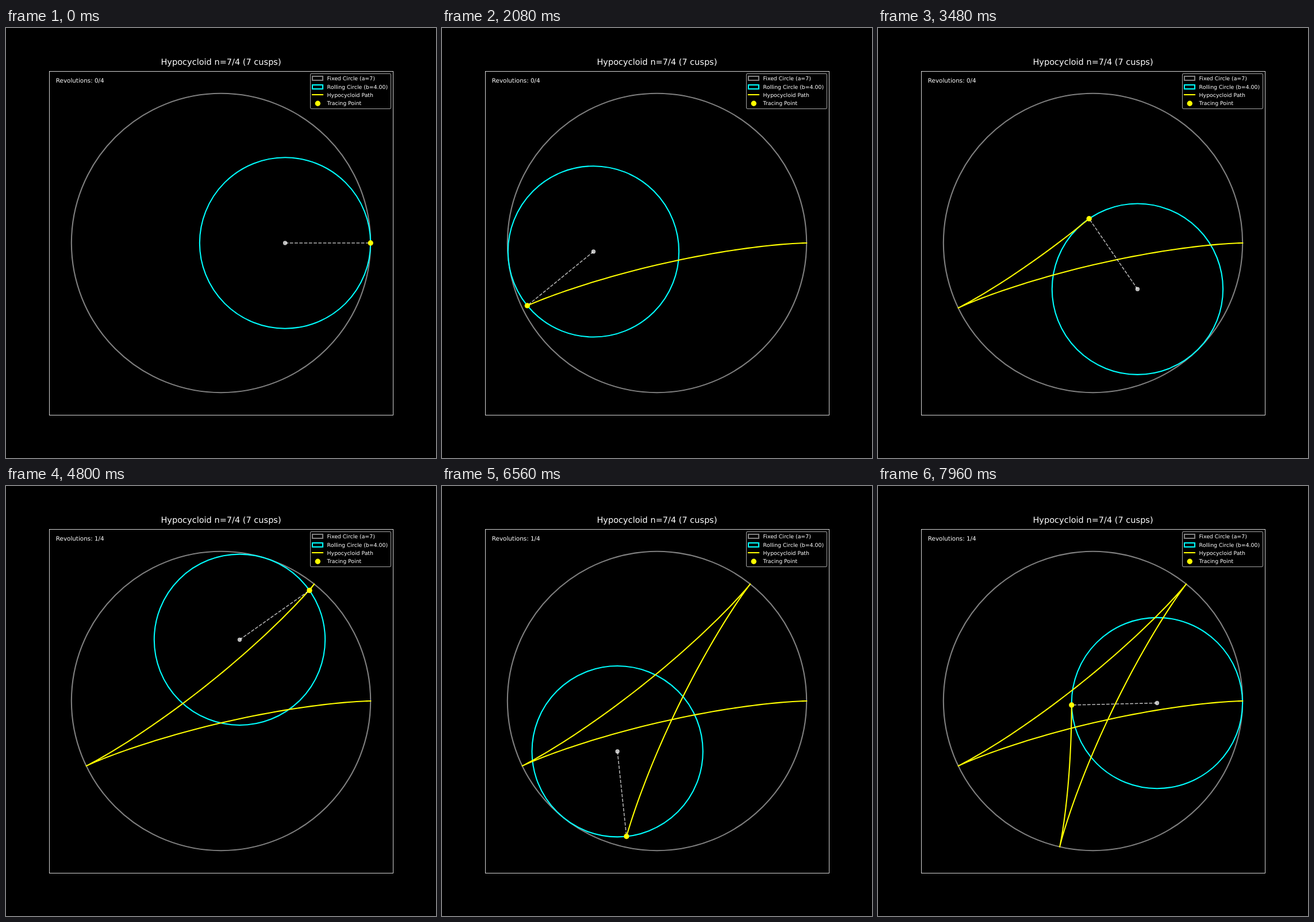
An HTML page for the animation above (8 s loop, 748x748 px).

```html
<!DOCTYPE html>
<html lang="en">
<head>
<meta charset="utf-8">
<title>Hypocycloid</title>
<style>
  html, body { margin: 0; width: 100%; height: 100%; overflow: hidden; background: #000; }
  svg { display: block; width: 100vw; height: 100vh; }
  text { font-family: "DejaVu Sans", sans-serif; fill: #fff; text-rendering: geometricPrecision; }
  .line { fill: none; stroke-width: 2.08; }
  .fixed { stroke: #808080; }
  .rolling { stroke: #0ff; }
  .path { stroke: #ff0; stroke-linecap: square; stroke-linejoin: round; }
  .legend text { font-size: 9.35px; }
</style>
</head>
<body>
<svg viewBox="0 0 748 748">
  <rect width="748" height="748"/>
  <circle class="line fixed" cx="374" cy="374" r="260.17"/>
  <circle id="rolling" class="line rolling" r="148.67"/>
  <polyline id="path" class="line path"/>
  <line id="radius" stroke="#fff" stroke-opacity=".7" stroke-width="1.56" stroke-dasharray="5.77 2.49"/>
  <circle id="center" r="3.12" fill="#fff" fill-opacity=".7" stroke="#fff" stroke-opacity=".7" stroke-width="1.04"/>
  <circle id="tracer" r="4.68" fill="#ff0"/>
  <rect x="75.5" y="75.5" width="598" height="598" fill="none" stroke="#fff" stroke-width=".83"/>
  <text x="374" y="64" font-size="14.54" text-anchor="middle">Hypocycloid n=7/4 (7 cusps)</text>
  <text id="count" x="86.8" y="95" font-size="10.39"></text>
  <g class="legend">
    <rect x="529.5" y="79.5" width="140" height="61" rx="1.9" fill-opacity=".8" stroke="#ccc" stroke-opacity=".8" stroke-width="1.04"/>
    <rect class="line fixed" x="533" y="84" width="18" height="7"/>
    <rect class="line rolling" x="533" y="99" width="18" height="7"/>
    <path class="line path" d="M533 116H551"/>
    <circle cx="542.3" cy="131.2" r="4.68" fill="#ff0"/>
    <text x="558.6" y="91">Fixed Circle (a=7)</text>
    <text x="558.6" y="106">Rolling Circle (b=4.00)</text>
    <text x="558.6" y="120">Hypocycloid Path</text>
    <text x="558.6" y="134">Tracing Point</text>
  </g>
</svg>
<script>
  const MID = 374, UNIT = 598.4 / 16.1;
  const A = 7 * UNIT, B = 4 * UNIT, ARM = A - B;
  const STEP_MS = 40, STEPS = 200, TURN = 2 * Math.PI;
  const STEP_ANGLE = 4 * TURN / 399;
  const el = id => document.getElementById(id);
  const [rolling, path, radius, center, tracer, count] =
    ["rolling", "path", "radius", "center", "tracer", "count"].map(el);

  const set = (node, attrs) => {
    for (const key in attrs) node.setAttribute(key, attrs[key]);
  };
  const centerAt = angle => [MID + ARM * Math.cos(angle), MID - ARM * Math.sin(angle)];
  const pointAt = angle => {
    const [cx, cy] = centerAt(angle), spin = angle * ARM / B;
    return [cx + B * Math.cos(spin), cy + B * Math.sin(spin)];
  };
  const trail = Array.from({ length: STEPS }, (_, i) => pointAt(i * STEP_ANGLE));

  function draw(step) {
    const angle = step * STEP_ANGLE;
    const [cx, cy] = centerAt(angle), [x, y] = trail[step];
    set(rolling, { cx, cy });
    set(center, { cx, cy });
    set(tracer, { cx: x, cy: y });
    set(radius, { x1: cx, y1: cy, x2: x, y2: y });
    set(path, { points: trail.slice(0, step + 1).join(" ") });
    count.textContent = `Revolutions: ${Math.floor(angle / TURN)}/4`;
  }

  function tick() {
    draw(Math.floor(performance.now() / STEP_MS) % STEPS);
    requestAnimationFrame(tick);
  }
  tick();
</script>
</body>
</html>
```
